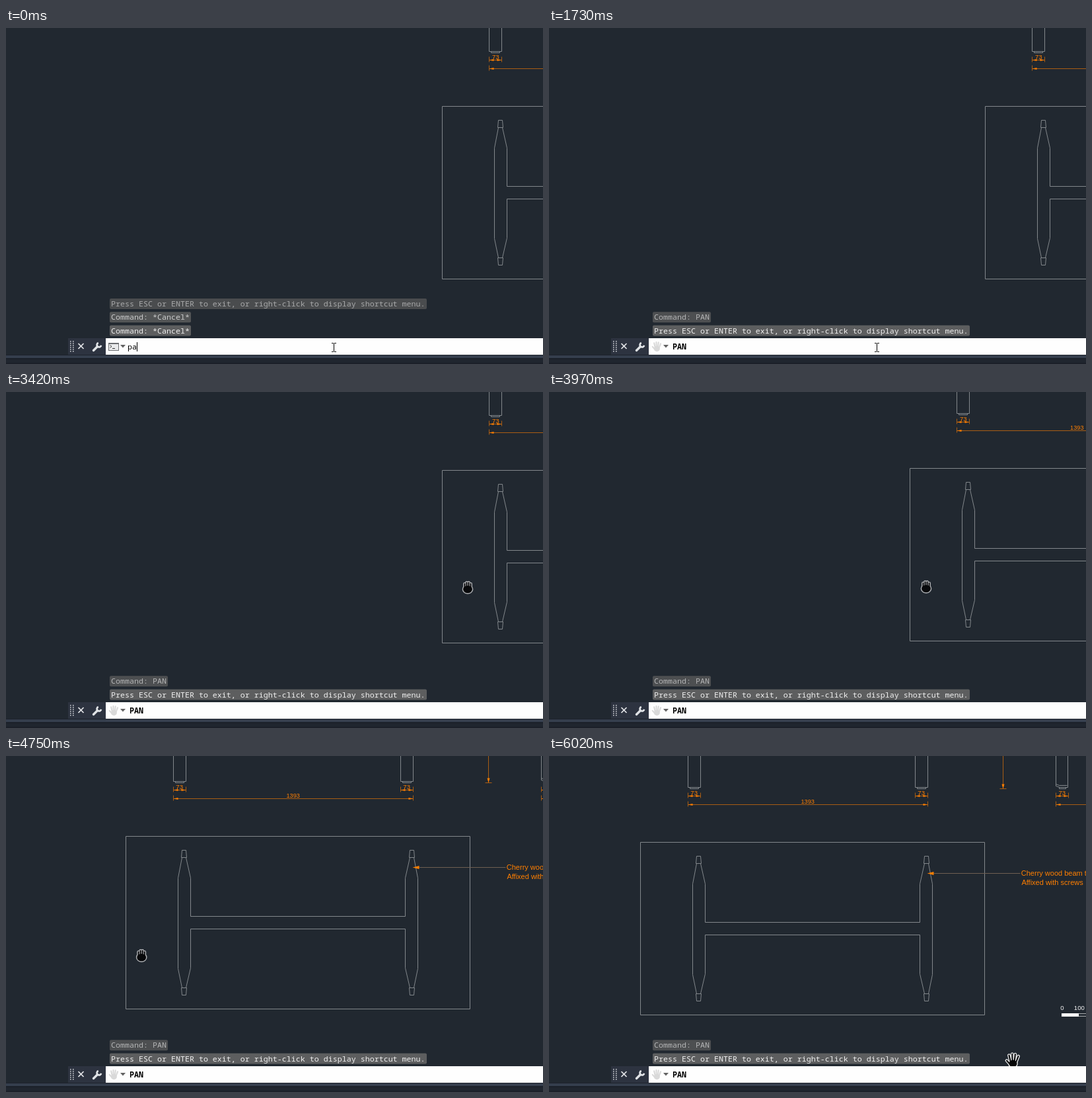
Animation, 813 px wide and 508 px high, one loop 6.98 s. Source, as an HTML page with a canvas:

```html
<!DOCTYPE html>
<html lang="en">
<head>
<meta charset="utf-8">
<title>Pan command</title>
<style>
html, body { margin: 0; width: 100%; height: 100%; overflow: hidden; background: #212830; }
canvas { display: block; }
</style>
</head>
<body>
<canvas id="stage" width="813" height="508"></canvas>
<script>
const ctx = document.getElementById('stage').getContext('2d');
const LOOP = 6980;
const MONO = '11.67px "Noto Sans Mono", monospace';
const SANS = '"Liberation Sans", Arial, sans-serif';
const GRAY = '#82878b', ORANGE = '#ff7f00', DIM = '#a85d14', LEADER = '#6f5f52';

// The screen refreshes in beats; motion is a smooth curve sampled on each beat.
const BEAT = 133, FIRST = 2240;
const beatAt = t => Math.floor((t - FIRST) / BEAT + 0.25);

// key points: beat, x, y
const handKeys = [
  [0, 510, 455], [1, 487, 427], [2, 494, 357], [7, 699, 295], [10, 699, 295],
  [13, 571, 294], [17, 281.5, 292.5], [21, 178, 310], [24, 178.5, 307],
  [26, 440, 329.5], [27, 702, 460]
];
const panKeys = [[10, 0, 0], [13, -114, -3], [17, -408.6, -6], [21, -520.4, 12], [22, -521.6, 12]];

// Cubic through the keys, flat at ends and turning points.
function follow(keys, beat, axis) {
  const last = keys.length - 1;
  if (beat <= keys[0][0]) return keys[0][axis];
  if (beat >= keys[last][0]) return keys[last][axis];
  const slope = i => {
    if (i === 0 || i === last) return 0;
    const [a, b, c] = [keys[i - 1], keys[i], keys[i + 1]];
    if ((b[axis] - a[axis]) * (c[axis] - b[axis]) <= 0) return 0;
    return (c[axis] - a[axis]) / (c[0] - a[0]);
  };
  const i = keys.findIndex(k => k[0] > beat) - 1;
  const a = keys[i], b = keys[i + 1], span = b[0] - a[0];
  const u = (beat - a[0]) / span, v = 1 - u;
  return v * v * (1 + 2 * u) * a[axis] + u * u * (3 - 2 * u) * b[axis]
    + span * u * v * (v * slope(i) - u * slope(i + 1));
}

function box(x, y, w, h, color) {
  ctx.fillStyle = color;
  ctx.fillRect(x, y, w, h);
}

function text(str, x, y, color, font, align = 'left') {
  ctx.font = font;
  ctx.fillStyle = color;
  ctx.textAlign = align;
  ctx.fillText(str, x, y);
}

function trace(points) {
  ctx.beginPath();
  points.forEach(([x, y], i) => i ? ctx.lineTo(x, y) : ctx.moveTo(x, y));
}

function poly(points, color, width = 1) {
  trace(points);
  ctx.strokeStyle = color;
  ctx.lineWidth = width;
  ctx.stroke();
}

function solid(points, color) {
  trace(points);
  ctx.fillStyle = color;
  ctx.fill();
}

function oval(x, y, rx, ry, fill, stroke, width = 1) {
  ctx.beginPath();
  ctx.ellipse(x, y, rx, ry, 0, 0, Math.PI * 2);
  if (fill) {
    ctx.fillStyle = fill;
    ctx.fill();
  }
  if (stroke) {
    ctx.strokeStyle = stroke;
    ctx.lineWidth = width;
    ctx.stroke();
  }
}

function drawModel(dx, dy) {
  const X = x => Math.round(x + dx) + 0.5;
  const Y = y => Math.round(y + dy) + 0.5;
  const line = (pts, color = GRAY) => poly(pts.map(([x, y]) => [X(x), Y(y)]), color);
  const frame = (x, y, w, h, color = GRAY) =>
    line([[x, y], [x + w, y], [x + w, y + h], [x, y + h], [x, y]], color);
  const label = (str, x, y, size, color = ORANGE, align = 'center') =>
    text(str, x + dx, Math.round(y + dy), color, size + 'px ' + SANS, align);

  // arrowhead with its tip at x,y pointing along ux,uy
  const arrow = (x, y, ux, uy, len = 7, half = 1.5) => {
    const px = X(x), py = Y(y), bx = px - ux * len, by = py - uy * len;
    solid([[px, py], [bx - uy * half, by + ux * half], [bx + uy * half, by - ux * half]], ORANGE);
  };
  const dimension = (x, width, y, str, size) => {
    line([[x, y], [x + width, y]], DIM);
    for (const end of [x, x + width]) line([[end, y - 5], [end, y + 3]], DIM);
    arrow(x, y, -1, 0);
    arrow(x + width, y, 1, 0);
    label(str, x + width / 2 + 0.5, y - 1, size);
  };

  // top view: table top, two mirrored legs and the beam
  frame(660, 118, 520.8, 261);
  const leg = (c, side) => {
    const p = (x, y) => [c + side * x, y];
    line([p(-3, 150), p(-9, 181), p(-9, 318), p(-3, 347)]);
    line([p(3, 150), p(10, 181), p(10, 239)]);
    line([p(10, 258), p(10, 317), p(3, 347)]);
    for (const [y, tip] of [[150, 139], [347, 358]])
      line([p(-4, y), p(4, y), p(3, tip), p(-3, tip), p(-4, y)]);
  };
  leg(747.9, 1);
  leg(1093, -1);
  for (const y of [239, 258]) line([[757.9, y], [1083, y]]);

  // front view
  for (const x of [731.3, 1075.3]) {
    line([[x, -60], [x, 35], [x + 19, 35], [x + 19, -60]]);
    frame(x + 3, 35, 13, 2);
    dimension(x, 19, 48, '73', 9.6);
  }
  dimension(731.3, 363, 61, '1393', 9.2);

  // height
  line([[1208.9, -60], [1208.9, 37]], DIM);
  line([[1204, 37], [1214, 37]], DIM);
  arrow(1208.9, 37, 0, 1, 7, 2);

  // side view
  line([[1288.6, -60], [1288.6, 33], [1295, 35], [1306.6, 35], [1306.6, -60]]);
  line([[1288.6, 30], [1294, 32], [1306, 32]]);
  frame(1294, 35, 10, 2);
  dimension(1288.6, 18.6, 48, '73', 9.6);
  dimension(1288.6, 300, 61, '850', 9.2);

  // note with leader
  line([[1104, 165], [1235, 165]], LEADER);
  arrow(1094, 165, -1, 0, 10, 2.4);
  label('Cherry wood beam to', 1236.4, 169, 11, ORANGE, 'left');
  label('Affixed with screws', 1237, 182.5, 11, ORANGE, 'left');

  // scale bar
  frame(1298, 377, 52, 4, '#a8abad');
  box(X(1298) - 0.5, Y(377) - 0.5, 26, 5, '#fff');
  label('0', 1298.4, 372, 9.6, '#f4f4f4');
  label('100', 1324.4, 372, 9.6, '#f4f4f4');
}

// Each pass paints the whole hand, so a wide pale one leaves an outline under a thin dark one.
function drawHand(x, y, scale, closed, passes) {
  ctx.save();
  ctx.translate(x, y);
  ctx.scale(scale, scale);
  ctx.lineCap = 'round';
  for (const [color, width] of passes) {
    if (closed) oval(0, 3.5, 6.3, 5, color, color, width);
    else oval(0.5, 5, 5, 4.4, color, color, width);
    for (let i = 0; i < 4; i++) {
      const root = closed ? [-4.8 + 3.2 * i, 1] : [-3 + 2.7 * i, 3];
      const tip = closed ? [-4.8 + 3.2 * i, -7.5 + (i - 1.5) ** 2]
                         : [-5.5 + 4.7 * i, -9.5 + 1.2 * (i - 1.3) ** 2];
      poly([root, tip], color, width);
    }
    if (!closed) poly([[-4, 6], [-9, 0.5]], color, width);
  }
  ctx.restore();
}

const iconHand = (x, y, color) => drawHand(x, y, 0.7, false, [[color, 3]]);

function drawCursor(t) {
  if (t < 2250) return;
  const closed = t >= 3420 && t < 5450;
  const beat = beatAt(t);
  drawHand(follow(handKeys, beat, 1), follow(handKeys, beat, 2), closed ? 0.95 : 1, closed,
    closed ? [['#aeb0b3', 5], ['#08090b', 2]] : [['#e4e5e6', 4.8], ['#050607', 2]]);
}

function historyLine(str, row, back, color) {
  const y = 409 + 20.3 * row;
  ctx.fillStyle = back;
  ctx.beginPath();
  ctx.roundRect(157, y, str.length * 7 + 4, 16, 2);
  ctx.fill();
  text(str, 159, Math.round(y + 12), color, MONO);
}

function drawHistory(t) {
  const hint = 'Press ESC or ENTER to exit, or right-click to display shortcut menu.';
  const cancel = 'Command: *Cancel*';
  if (t < 1730) {
    historyLine(hint, 0, '#4a4c4e', '#a7a8a9');
    historyLine(cancel, 1, '#535556', '#cbcccc');
    historyLine(cancel, 2, '#5d5e5f', '#f0f0f0');
  } else {
    historyLine('Command: PAN', 1, '#4d4f51', '#b4b5b6');
    historyLine(hint, 2, '#5d5e5f', '#f0f0f0');
  }
}

function drawPopup() {
  const dark = '#262c37', blue = '#58b2e8', pale = '#dfe3e8';
  box(152, 325, 318, 24, dark);
  box(152, 349, 318, 96, '#3b4453');
  box(152, 445, 318, 22, '#434c60');
  ['PAN', '3DPAN', 'RTPAN', '-PAN', 'DESKTOPANALYTICS'].forEach((name, i) => {
    text(name, 175, 341 + i * 24, '#f0f1f3', MONO);
    if (i < 4 && name !== 'RTPAN') iconHand(163, 337 + i * 24, '#e2e3e5');
  });

  oval(438, 337, 8, 8, '#d9dadb');
  text('?', 438, 341.5, '#2a303b', 'bold 12px ' + SANS, 'center');

  for (const rx of [7, 3.2]) oval(457, 336, rx, 7, null, blue);
  for (const y of [-3.5, 0, 3.5]) {
    const half = Math.sqrt(49 - y * y);
    poly([[457 - half, 336 + y], [457 + half, 336 + y]], blue);
  }
  oval(461, 340, 3.5, 3.5, dark);
  oval(461, 340, 2.6, 2.6, null, pale);
  poly([[463, 342], [466, 345]], pale, 1.5);

  ctx.strokeStyle = '#62a8d5';
  ctx.lineWidth = 1;
  ctx.strokeRect(155.5, 450.5, 15, 11);
  text('GO', 163, 459, '#62a8d5', '7px ' + SANS, 'center');
  text('HPANG', 175, 461, '#b9c0cc', 'bold 12.8px ' + SANS);
  solid([[458, 456], [462, 452], [462, 460]], '#e4e6ea');
}

const caret = x => box(x, 475, 1, 14, '#000');

function drawBar(t) {
  box(94, 469, 57, 25, '#2d3340');
  box(151, 469, 662, 25, '#fefefe');
  box(0, 494, 813, 1, '#1d222b');
  box(0, 495, 813, 4, '#353e4d');
  box(0, 499, 813, 9, '#1b2029');
  box(0, 501, 813, 5, '#20262f');

  for (let y = 473; y < 490; y += 3)
    for (const x of [97, 101]) box(x, y, 1.6, 1.6, '#c9ccd1');
  for (const s of [-4, 4]) poly([[113.5 - s, 477], [113.5 + s, 485]], '#e4e6e9', 1.7);

  // wrench
  ctx.lineCap = 'round';
  poly([[132.5, 487.5], [138.5, 481.5]], '#e0e3e6', 3.4);
  ctx.lineCap = 'butt';
  ctx.beginPath();
  ctx.arc(140.8, 479.2, 3.2, 0.15, Math.PI * 1.4);
  ctx.lineWidth = 2.8;
  ctx.stroke();

  solid([[173, 479], [181, 479], [177, 483.5]], '#626262');

  if (t < 1730) {
    box(155, 476, 16, 12, '#6b6d70');
    box(156, 478, 14, 9, '#e9eaeb');
    poly([[157.5, 479.5], [160, 481.5], [157.5, 483.5]], '#333');
    poly([[161, 484.5], [165, 484.5]], '#333');
    const typed = t < 270 ? 'pa' : t < 740 ? 'pan' : 'PAN';
    text(typed, 184, 486, '#000', MONO);
    if (t < 890 || t >= 1450) caret(184 + typed.length * 7);
  } else {
    iconHand(163, 481.5, '#d9d9d9');
    text('PAN', 187, 486, '#000', 'bold ' + MONO);
    if (t >= 1850 && t < 2250) caret(214);
  }

  if (t < 2250) {
    box(496, 477, 1, 12, '#000');
    for (const y of [476, 489])
      for (const x of [493, 497]) box(x, y, 3, 1, '#000');
  }
}

function draw(t) {
  const beat = beatAt(t);
  box(0, 0, 813, 508, '#212830');
  drawModel(follow(panKeys, beat, 1), follow(panKeys, beat, 2));
  drawHistory(t);
  if (t >= 120 && t < 1730) box(805, 465, 8, 1, '#85888c');
  if (t >= 740 && t < 1730) drawPopup();
  drawCursor(t);
  drawBar(t);
  if (t >= 5870 && t < 6020) solid([[738, 504], [742, 508], [738, 508]], '#f4f4f4');
}

const start = performance.now();
function tick(now) {
  draw(Math.max(0, now - start) % LOOP);
  requestAnimationFrame(tick);
}
tick(start);
</script>
</body>
</html>
```
